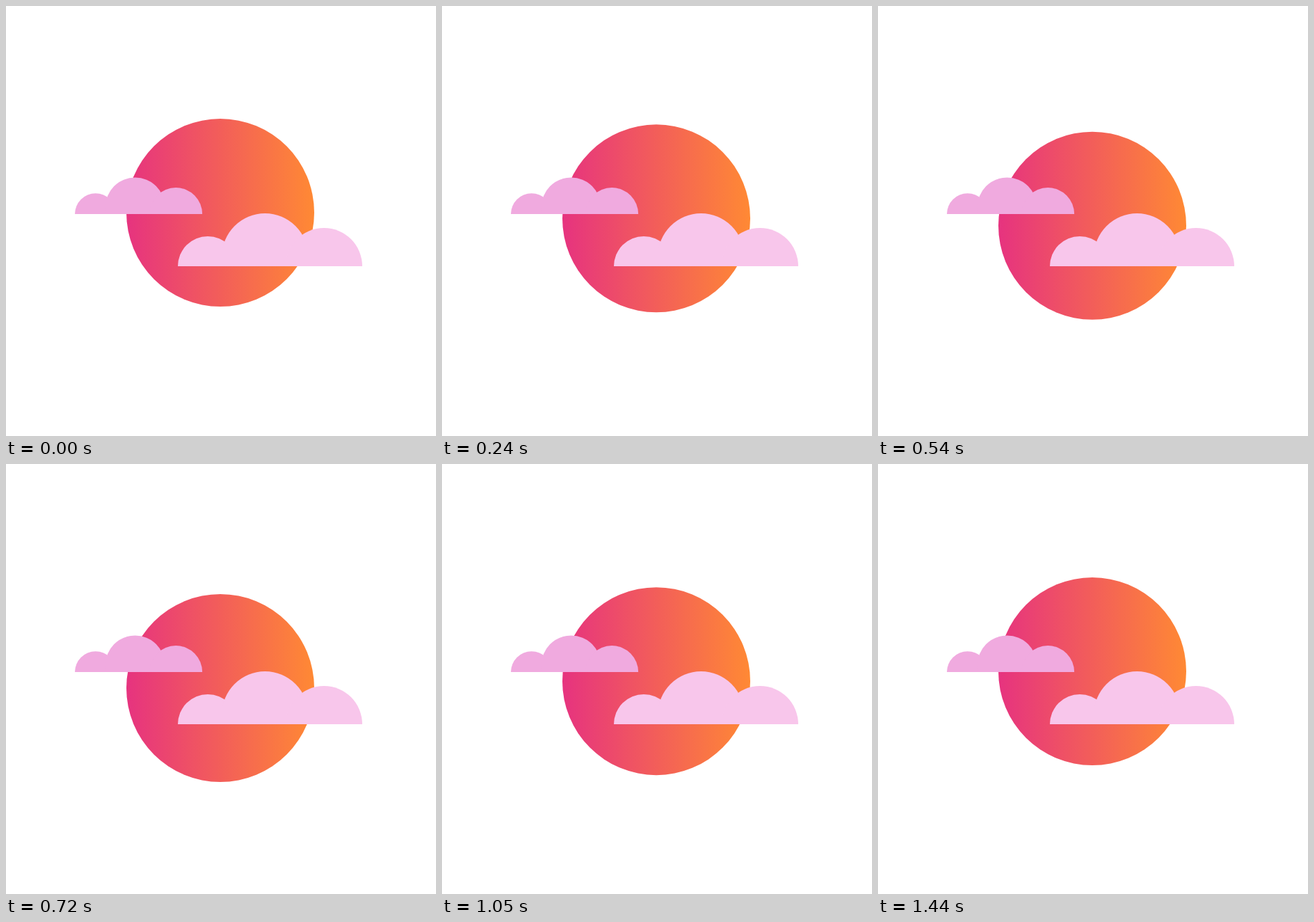
An HTML page that plays this animation: 618 by 618 pixels, repeating every 1470 ms.

```html
<!DOCTYPE html>
<html lang="en">
<head>
<meta charset="utf-8">
<title>Sun and clouds</title>
<style>
  html, body { margin: 0; width: 100%; height: 100%; overflow: hidden; background: #fff; }
  svg { display: block; width: 100%; height: 100%; }
</style>
</head>
<body>
<svg viewBox="0 0 618 618">
  <defs>
    <linearGradient id="glow">
      <stop stop-color="#e6337f"/>
      <stop offset="1" stop-color="#ff8934"/>
    </linearGradient>
    <clipPath id="aboveBase"><rect y="-90" width="270" height="90"/></clipPath>
    <!-- Left end of the flat base is at 0,0 -->
    <g id="cloud" clip-path="url(#aboveBase)">
      <circle cx="43" r="43"/>
      <circle cx="125.3" cy="-14" r="62"/>
      <circle cx="210" r="55"/>
    </g>
  </defs>
  <circle id="sun" cx="308" cy="297" r="135" fill="url(#glow)"/>
  <use href="#cloud" transform="translate(99 299) scale(.691)" fill="#f0aadf"/>
  <use href="#cloud" transform="translate(247 374)" fill="#f8c6eb"/>
</svg>
<script>
  const LOOP = 1470, TURN = 750, TOP = 297, DROP = 26;
  const sun = document.getElementById('sun');

  function draw() {
    const t = performance.now() % LOOP;
    const depth = t < TURN ? t / TURN : (LOOP - t) / (LOOP - TURN);
    sun.setAttribute('cy', TOP + DROP * depth);
    requestAnimationFrame(draw);
  }
  draw();
</script>
</body>
</html>
```
